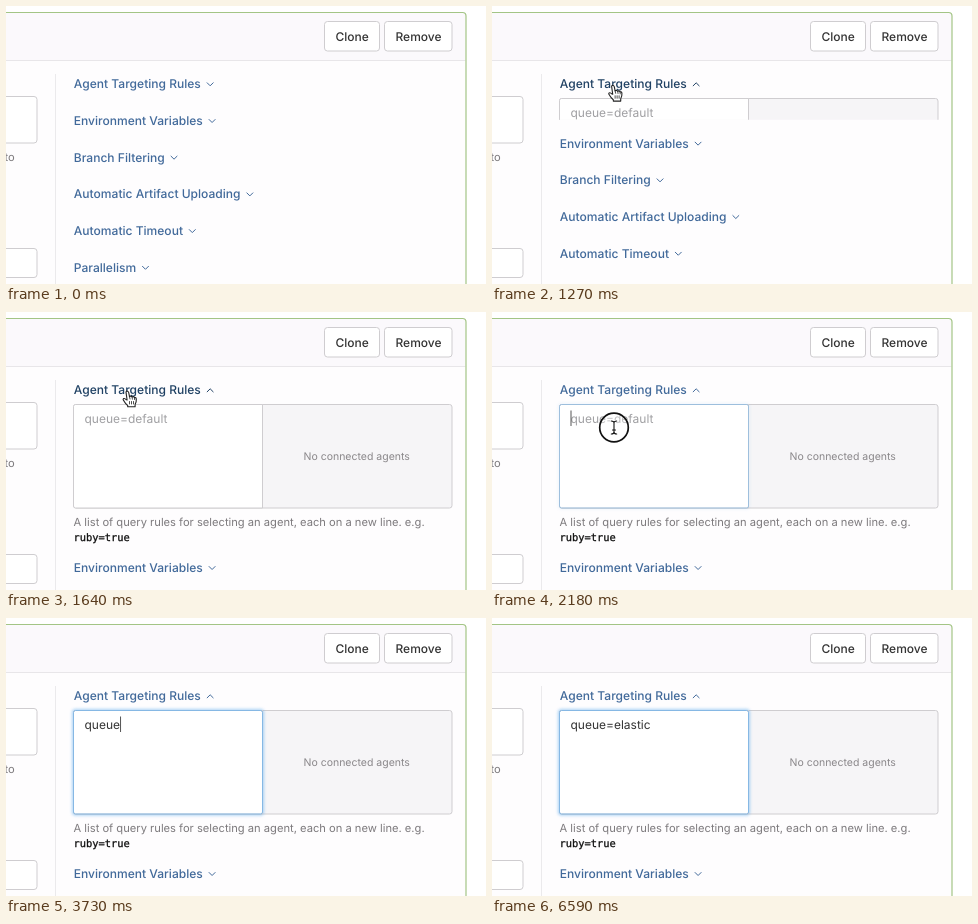
Animation of 480 by 278 pixels, one loop 7.1 s. Source, as an HTML page:

```html
<!DOCTYPE html>
<html lang="en">
<head>
<meta charset="utf-8">
<title>Agent targeting rules</title>
<style>
  html, body { margin: 0; width: 100%; height: 100%; overflow: hidden; background: #fff; }
  svg { display: block; }
  text { font-family: Inter, "Open Sans", sans-serif; font-size: 12px; text-rendering: geometricPrecision; white-space: pre; }
  .link { fill: #41699a; }
  .link text { font-size: 12.05px; font-weight: 500; }
  .chevron { fill: none; stroke: #41699a; stroke-linecap: round; stroke-linejoin: round; }
  .hover { fill: #1f4063; }
  .hover .chevron { stroke: #1f4063; }
  .box { fill: #fff; stroke: #cfcdd0; }
  .button { font-weight: 500; fill: #333; }
  .help { font-size: 11.16px; fill: #7d7a7d; }
  .code { font: 10.4px "DejaVu Sans Mono", monospace; fill: #111; stroke: #111; stroke-width: .3; }
  .empty { font-size: 10.5px; fill: #8a878a; }
</style>
</head>
<body>
<svg width="480" height="278" viewBox="0 0 480 278">
  <defs>
    <clipPath id="reveal"><rect id="revealBox" x="60" y="86" width="400" height="0"/></clipPath>
    <filter id="blur" x="-10%" y="-10%" width="120%" height="120%"><feGaussianBlur stdDeviation="1.8"/></filter>
  </defs>

  <path d="M-5 6.500H456.500Q460 6.500 460 10V285H-5Z" fill="#fefdfe"/>
  <path d="M-5 6.500H456.500Q460 6.500 460 10V54H-5Z" fill="#fbf9fc"/>
  <path d="M0 54.500H459.500" stroke="#e8e6e9"/>
  <path d="M-5 6.500H456.500Q460 6.500 460 10V285" fill="none" stroke="#a3c585" stroke-width="1.200"/>
  <path d="M49.500 68V278" stroke="#ebeaec"/>

  <rect class="box" x="318.500" y="15.500" width="55" height="29.500" rx="3"/>
  <rect class="box" x="378.500" y="15.500" width="67.500" height="29.500" rx="3"/>
  <text class="button" x="329.500" y="35">Clone</text>
  <text class="button" x="389.500" y="35">Remove</text>

  <rect class="box" x="-10" y="90.500" width="41" height="46.500" rx="3"/>
  <rect class="box" x="-10" y="242.500" width="41" height="29" rx="3"/>
  <text class="help" x="-1.500" y="154.500">to</text>

  <g id="first"></g>
  <g id="rest"></g>

  <g clip-path="url(#reveal)">
    <rect x="67.500" y="92.500" width="378.500" height="103.500" rx="2.500" fill="#f6f5f7" stroke="#cfcdd0"/>
    <text class="empty" x="297.500" y="147.500">No connected agents</text>
    <rect id="glow" x="67.500" y="92.500" width="189" height="103.500" rx="2" fill="none" stroke="#6cb2ee" stroke-width="3" filter="url(#blur)"/>
    <path d="M256.500 92.500H69.500Q67.500 92.500 67.500 94.500V194Q67.500 196 69.500 196H256.500Z" fill="#fff" stroke="#cfcdd0"/>
    <rect id="focus" x="67.500" y="92.500" width="189" height="103.500" rx="2" fill="none" stroke="#86b8e4"/>
    <text id="field" x="78.500" y="111"></text>
    <path id="caret" d="M0 98.500V114" stroke="#555"/>
    <text class="help" x="67.500" y="213.500">A list of query rules for selecting an agent, each on a new line. e.g.</text>
    <text class="code" x="67.500" y="229">ruby=true</text>
  </g>

  <g id="pointer">
    <circle id="press" r="14.300" fill="#fff" fill-opacity=".35" stroke="#111" stroke-width="1.700"/>
    <path id="arrow" d="M0 0V14L3.200 11L5.400 16L7.700 15L5.500 10.200H10Z" fill="#111" stroke="#fff"/>
    <g id="hand" fill="#fff" stroke="#222" stroke-width="1.100" stroke-linejoin="round" stroke-linecap="round">
      <path d="M-1.500 1.200Q-1.200 -.2 .1 .2Q1 .5 1.200 1.500L2 5.600Q3.600 4.500 4.600 6Q6.200 5 7 6.600Q8.700 6.100 8.800 8.200Q9 11 7.600 13.400V15.800H.2V14.500Q-2.200 12.500 -3.400 10.200Q-5 8.300 -4 7.600Q-2.700 7 -1.100 8.800L-.4 9Z"/>
      <path d="M2 5.600L2.500 8M4.600 6L4.900 8.200M7 6.600L7.100 8.600M2 10.500V13M4 10.500V13M6 10.500V13" fill="none" stroke-width=".8"/>
    </g>
    <g id="beam" fill="none" stroke-linecap="round">
      <path d="M-2.700 -6.500Q0 -6.500 0 -4.500V4.500Q0 6.500 -2.700 6.500M2.700 -6.500Q0 -6.500 0 -4.500V4.500Q0 6.500 2.700 6.500M-1.500 2.500H1.500" stroke="#fff" stroke-width="2.600"/>
      <path d="M-2.700 -6.500Q0 -6.500 0 -4.500V4.500Q0 6.500 -2.700 6.500M2.700 -6.500Q0 -6.500 0 -4.500V4.500Q0 6.500 2.700 6.500M-1.500 2.500H1.500" stroke="#111" stroke-width="1.100"/>
    </g>
  </g>
</svg>
<script>
const LOOP = 7100, OPEN = 1166, SLIDE = 400, FOCUS = 2130;
const ROWS = ["Agent Targeting Rules", "Environment Variables", "Branch Filtering",
  "Automatic Artifact Uploading", "Automatic Timeout", "Parallelism"];

// [time, characters typed]
const TYPING = [[3230, 1], [3450, 2], [3550, 3], [3640, 4], [3730, 5], [4360, 7],
  [4500, 8], [4590, 9], [4770, 10], [4910, 11], [5000, 12], [5090, 13]];
const VALUE = "queue=elastic";

// [time, x, y]
const PATH = [[50, -12, 125], [730, 118.5, 82], [950, 119.5, 80.5], [1400, 121.5, 79],
  [1640, 121.5, 79], [2000, 122, 115.5]];
const PRESSES = [[1070, 1200], [2130, 2270]];

const $ = id => document.getElementById(id);
const clamp = v => Math.max(0, Math.min(1, v));
const swing = v => 0.5 - Math.cos(clamp(v) * Math.PI) / 2;
const show = (id, on) => $(id).setAttribute("visibility", on ? "visible" : "hidden");

function make(tag, attrs, parent) {
  const el = document.createElementNS("http://www.w3.org/2000/svg", tag);
  for (const key in attrs) el.setAttribute(key, attrs[key]);
  return parent.appendChild(el);
}

const rows = ROWS.map((label, i) => {
  const y = 78 + i * 36.7;
  const row = make("g", { class: "link" }, $(i ? "rest" : "first"));
  const text = make("text", { x: 67.8, y: y + 4.2 }, row);
  text.textContent = label;
  const chevron = make("path", { class: "chevron", d: "M-3 -1.5L0 1.5L3 -1.5" }, row);
  return { row, text, chevron, y };
});

function placeChevrons(open) {
  rows.forEach(({ text, chevron, y }, i) => {
    const x = 67.8 + text.getComputedTextLength() + 9.3;
    const flip = open && !i ? -1 : 1;
    chevron.setAttribute("transform", `translate(${x} ${y + 0.3}) scale(1 ${flip})`);
  });
}

function pointerAt(t) {
  const i = PATH.findIndex(p => p[0] > t);
  if (i < 0) return PATH[PATH.length - 1].slice(1);
  if (i === 0) return PATH[0].slice(1);
  const [a, b] = [PATH[i - 1], PATH[i]];
  const k = swing((t - a[0]) / (b[0] - a[0]));
  return [a[1] + (b[1] - a[1]) * k, a[2] + (b[2] - a[2]) * k];
}

function drawPanel(t) {
  const k = swing((t - OPEN) / SLIDE);
  $("revealBox").setAttribute("height", k ? 5 + 141 * k : 0);
  $("rest").setAttribute("transform", `translate(0 ${141 * k})`);
  placeChevrons(t >= OPEN);
}

function drawField(t) {
  const past = TYPING.filter(s => s[0] <= t);
  const typed = past.length ? VALUE.slice(0, past[past.length - 1][1]) : "";
  const field = $("field");
  field.textContent = typed || "queue=default";
  field.setAttribute("fill", typed ? "#333" : "#a0a0a3");

  const last = past.length ? past[past.length - 1][0] : 2590;
  const lit = t < last || Math.floor((t - last) / 500) % 2 === 0;
  const x = 79 + (typed ? field.getComputedTextLength() : 0);
  $("caret").setAttribute("transform", `translate(${x} 0)`);
  show("caret", t >= FOCUS && lit);

  const k = swing((t - FOCUS + 60) / 400);
  $("focus").setAttribute("opacity", t < FOCUS ? 0 : Math.min(1, 0.5 + k));
  $("glow").setAttribute("opacity", t < FOCUS ? 0 : k * 0.6);
}

function drawPointer(t) {
  const [x, y] = pointerAt(t);
  const visible = t >= 50 && t < TYPING[0][0];
  const hover = visible && x > 66 && y > 70 && y < 89;
  const beam = visible && t > OPEN && y > 93;
  $("pointer").setAttribute("transform", `translate(${x} ${y})`);
  show("hand", hover);
  show("beam", beam);
  show("arrow", visible && !hover && !beam);
  show("press", PRESSES.some(([a, b]) => t >= a && t < b));
  rows[0].row.classList.toggle("hover", hover);
}

function render(t) {
  drawPanel(t);
  drawField(t);
  drawPointer(t);
}

const start = performance.now();
function tick() {
  render((performance.now() - start) % LOOP);
  requestAnimationFrame(tick);
}
tick();
</script>
</body>
</html>
```
